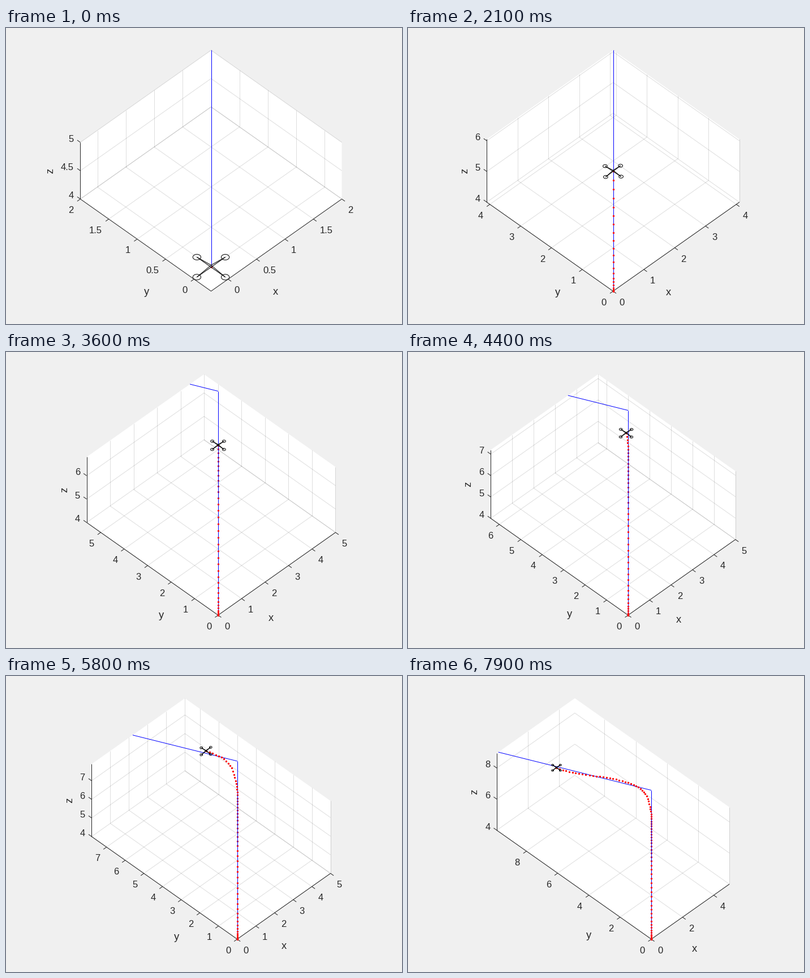
These frames come from a looping animation (700x525 px, 8000 ms). A matplotlib script:

```python
import numpy as np
import matplotlib.pyplot as plt
from matplotlib.animation import FuncAnimation

W, H, DPI = 700, 525, 100
COUNT, STEP_MS = 80, 100
CX, BOTTOM, HEIGHT = 362.5, 466.75, 427.3   # area the 3D box is fitted into
R2 = np.sqrt(0.5)
INK = (38 / 255,) * 3
PX = 72 / DPI

plt.rcParams["font.family"] = "Liberation Sans"
fig = plt.figure(figsize=(W / DPI, H / DPI), dpi=DPI, facecolor="#f0f0f0")
ax = fig.add_axes([0, 0, 1, 1])

# Flight path, one knot every 0.4 s, in data units:
# SIDE is x - y, RISE is the height on screen.
SIDE = [0] * 10 + [-0.005, -0.092, -0.305, -0.71, -1.31, -2.06,
                   -2.876, -3.745, -4.631, -5.463, -6.28]
RISE = [0, 0.077, 0.408, 0.987, 1.738, 2.556, 3.357, 4.069, 4.643, 5.132, 5.585,
        6.015, 6.50, 6.845, 7.06, 7.228, 7.344, 7.434, 7.528, 7.651, 7.84]


def spline(knots, k):
    """Catmull-Rom through evenly spaced knots, starting at rest."""
    p = np.array([knots[1], *knots, 2 * knots[-1] - knots[-2]], float)
    u = np.asarray(k) / 4
    i = np.minimum(u.astype(int), len(knots) - 2)
    f = u - i
    a, b, c, d = p[i], p[i + 1], p[i + 2], p[i + 3]
    return b + 0.5 * f * (c - a + f * (2 * a - 5 * b + 4 * c - d
                                       + f * (3 * (b - c) + d - a)))


STEPS = np.arange(COUNT)
SIDES, RISES = spline(SIDE, STEPS), spline(RISE, STEPS)


class View:
    """Orthographic view (azimuth -45, elevation 45) fitted to the stage."""

    def __init__(self, t):
        u = t + 2
        self.lo = min(0, 0.184 * (t / 0.8) ** 2.5 - 0.3)
        self.x1, self.y1, self.z1 = min(u, 5), u, 4 + u / 2
        rx, ry, rz = self.x1 - self.lo, self.y1 - self.lo, self.z1 - 4
        self.s = HEIGHT / ((rx + ry) / 2 + rz * R2)
        self.a = self.s * R2
        self.cx = CX + (ry - rx) * self.a / 2
        if self.a / 2 > 30.5:
            self.step = 0.5
        else:
            self.step = 1 if self.a > 28.4 else 2

    def shift(self, x, y, z):
        return np.array([self.a * (x - y), -self.s / 2 * (x + y) - self.a * z])

    def at(self, x, y, z):
        return np.array([self.cx, BOTTOM]) + self.shift(x - self.lo, y - self.lo, z - 4)

    def ticks(self, lo, hi):
        first = np.ceil(lo / self.step - 1e-6)
        last = np.floor(hi / self.step + 1e-6)
        return np.arange(first, last + 1) * self.step + 0.0


def line(pts, color=INK, width=1.0, **kw):
    xs, ys = zip(*pts)
    ax.plot(xs, ys, color=color, lw=width * PX, solid_capstyle="butt", **kw)


def label(x, y, s, ha, size=12, va="center_baseline", **kw):
    ax.text(x, y, s, ha=ha, va=va, size=size, color=INK, **kw)


def draw_box(v):
    lo, x1, y1, z1 = v.lo, v.x1, v.y1, v.z1
    left, corner, right = v.at(lo, y1, 4), v.at(lo, lo, 4), v.at(x1, lo, 4)
    outline = [corner, right, v.at(x1, lo, z1), v.at(x1, y1, z1),
               v.at(lo, y1, z1), left]
    ax.fill(*zip(*outline), color="white", lw=0)

    xt, yt, zt = v.ticks(lo, x1), v.ticks(lo, y1), v.ticks(4, z1)
    grid = dict(alpha=0.15)
    for x in xt:
        line([v.at(x, lo, 4), v.at(x, y1, 4)], **grid)
        line([v.at(x, y1, 4), v.at(x, y1, z1)], **grid)
    for y in yt:
        line([v.at(lo, y, 4), v.at(x1, y, 4)], **grid)
        line([v.at(x1, y, 4), v.at(x1, y, z1)], **grid)
    for z in zt:
        line([v.at(lo, y1, z), v.at(x1, y1, z)], **grid)
        line([v.at(x1, y1, z), v.at(x1, lo, z)], **grid)

    line([left, corner, right])
    line([left, v.at(lo, y1, z1)])
    for x in xt:
        p = v.at(x, lo, 4)
        line([p, p + (5.5, 3.9)])
        label(p[0] + 11, p[1] + 19, f"{x:g}", "left")
    for y in yt:
        p = v.at(lo, y, 4)
        line([p, p + (-5.5, 3.9)])
        label(p[0] - 11.5, p[1] + 19, f"{y:g}", "right")
    for z in zt:
        p = v.at(lo, y1, z)
        line([p, p + (-5.5, -3.9)])
        label(p[0] - 11.5, p[1] - 7, f"{z:g}", "right")

    extra = 13.9 if v.step < 1 else 0   # room for wider tick labels
    xp = corner + 0.2533 * (right - corner) + (41 + extra, 42.7)
    yp = corner + 0.2533 * (left - corner) + (-41.5 - extra, 42.7)
    zp = (left + v.at(lo, y1, z1)) / 2 - (39 + extra, 0)
    label(*xp, "x", "center", 13.2, "center")
    label(*yp, "y", "center", 13.2, "center")
    label(*zp, "z", "center", 13.2, "center", rotation=90)


def draw_drone(v, pos, t):
    yaw = np.radians(-14.7 * np.exp(-0.7 * t) * np.sin(np.pi * t / 1.75))
    tilt = (-0.15 * np.exp(-((t - 0.8) / 0.4) ** 2)
            + 0.1 * np.exp(-((t - 5.8) / 0.8) ** 2))
    e1 = v.shift(np.cos(yaw), np.sin(yaw), tilt)
    e2 = v.shift(-np.sin(yaw), np.cos(yaw), 0)
    apex = pos + v.shift(0, 0, 0.035)
    ring = np.linspace(0, 2 * np.pi, 33)[:, None]
    for arm in (e1, e2):
        ends = pos + 0.25 * arm, pos - 0.25 * arm
        line(ends, "black")
        line([ends[0], apex, ends[1]], "black")
        for end in ends:
            line(end + 0.05 * (np.cos(ring) * e1 + np.sin(ring) * e2), "black")


def draw(k):
    t = k / 10
    v = View(t)
    ax.clear()
    ax.set(xlim=(0, W), ylim=(H, 0))
    ax.axis("off")
    draw_box(v)

    u = min(t + 2, 5)
    path = [v.at(0, 0, 4), v.at(u, u, 4 + u / 2)]
    if t > 3:
        path.append(v.at(8 - t, v.y1, v.z1))
    # separate legs keep the upright one crisp
    for leg in zip(path, path[1:]):
        line(leg, "blue")

    ox, oy = path[0]
    xs = ox + v.a * SIDES[:k + 1]
    ys = oy - v.s * RISES[:k + 1]
    ax.plot(xs, ys, "o", color="red", ms=3.3 * PX, mew=0)
    if k > 25:
        # the planned path passes in front of the trail here
        line([(ox, ys[25]), (ox, ys[min(k, 39)])], "blue")
    draw_drone(v, np.array([xs[-1], ys[-1]]), t)
    return []


anim = FuncAnimation(fig, draw, frames=COUNT, interval=STEP_MS,
                     init_func=lambda: draw(0), repeat=True, repeat_delay=0)
plt.show()
```
